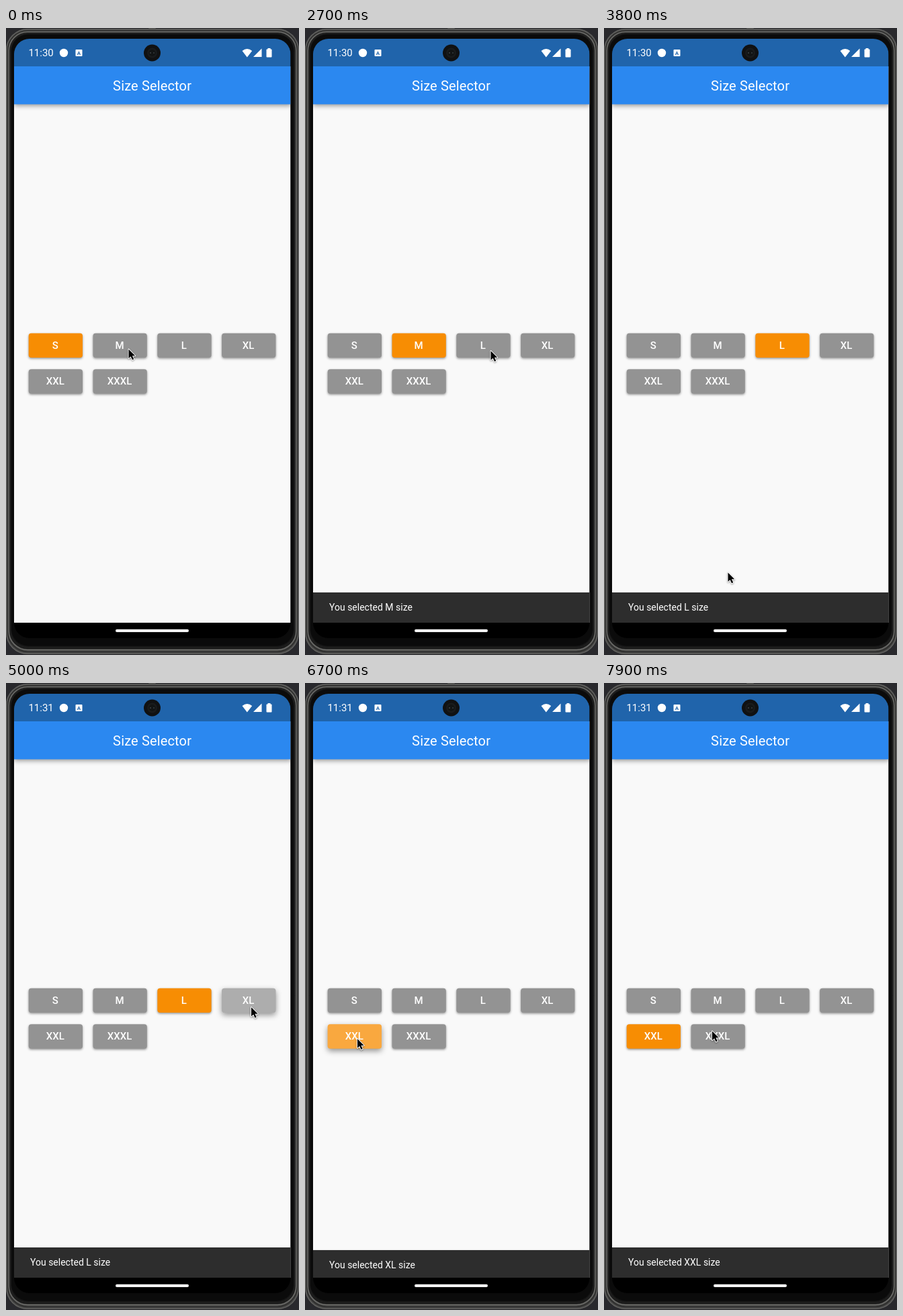
Animation, 436 px wide and 932 px high, one loop 8000 ms. Source, as an HTML page with a canvas:

```html
<!DOCTYPE html>
<html lang="en">
<head>
<meta charset="utf-8">
<title>Size Selector</title>
<style>
  html, body { margin: 0; width: 100%; height: 100%; overflow: hidden; background: #29292d; }
  canvas { display: block; width: 436px; height: 932px; }
</style>
</head>
<body>
<canvas id="stage"></canvas>
<script>
const W = 436, H = 932, LOOP = 8000, STEP = 100;
const canvas = document.getElementById('stage');
const dpr = window.devicePixelRatio || 1;
canvas.width = W * dpr;
canvas.height = H * dpr;
const ctx = canvas.getContext('2d');

const ORANGE = '#f78d03', GREY = '#939393';
const SIZES = ['S', 'M', 'L', 'XL', 'XXL', 'XXXL'];

// Each tap: button index, finger down and up, and the touch point.
const TAPS = [
  { i: 1, down: 300, up: 850, x: 183, y: 478, grow: [[300, 23], [499, 23], [500, 45], [600, 95]] },
  { i: 2, down: 2950, up: 3080, x: 277, y: 480 },
  { i: 3, down: 4850, up: 5060, x: 365, y: 482 },
  { i: 4, down: 6430, up: 6612, x: 78, y: 529 }
];

const SNACKS = [
  { size: 'M', enter: 850, exit: 3080 },
  { size: 'L', enter: 3330, exit: 5066 },
  { size: 'XL', enter: 5316, exit: 6615 },
  { size: 'XXL', enter: 6865, exit: Infinity }
];

// Pointer path: time, x, y.
const PATH = [
  [0, 182.5, 477.5], [1220, 182.5, 477.5], [1400, 180.5, 782.5], [1550, 178, 848],
  [1800, 178, 850], [2150, 236, 560], [2400, 270, 494], [2700, 276.5, 480],
  [3450, 276.5, 480], [3800, 184.5, 809.5], [3950, 178, 850], [4200, 178, 850],
  [4550, 352, 510], [4750, 365, 482], [5180, 365, 482], [5500, 174.5, 839.5],
  [5620, 172, 852], [5850, 172, 852], [6250, 92, 560], [6430, 78, 529],
  [6750, 78, 529], [7050, 148, 840], [7200, 152, 866], [7420, 152, 866],
  [7700, 158, 575], [7900, 161, 517.5], [8000, 161, 517.5]
];

const clamp = v => Math.max(0, Math.min(1, v));
const mix = (a, b, k) => a + (b - a) * k;

function follow(keys, t, col) {
  const n = keys.findIndex(k => k[0] > t);
  if (n < 0) return keys[keys.length - 1][col];
  if (n === 0) return keys[0][col];
  const a = keys[n - 1], b = keys[n];
  return mix(a[col], b[col], (t - a[0]) / (b[0] - a[0]));
}

// Cubic curve (0.4, 0, 0.2, 1), solved by bisection.
function fastOutSlowIn(x) {
  if (x <= 0 || x >= 1) return clamp(x);
  let lo = 0, hi = 1;
  for (let n = 0; n < 20; n++) {
    const s = (lo + hi) / 2, r = 1 - s;
    if (1.2 * s * r * r + 0.6 * s * s * r + s * s * s < x) lo = s; else hi = s;
  }
  return lo * lo * (3 - 2 * lo);
}

function rounded(x, y, w, h, r) {
  ctx.beginPath();
  ctx.roundRect(x, y, w, h, r);
}

function box(x, y, w, h, r, color) {
  rounded(x, y, w, h, r);
  ctx.fillStyle = color;
  ctx.fill();
}

function ring(inset, top, bottom, r, color, width) {
  rounded(inset, top, W - inset * 2, bottom - top, r);
  ctx.strokeStyle = color;
  ctx.lineWidth = width;
  ctx.stroke();
}

function poly(points, color) {
  ctx.beginPath();
  points.forEach(([x, y]) => ctx.lineTo(x, y));
  ctx.closePath();
  ctx.fillStyle = color;
  ctx.fill();
}

function disc(x, y, r, color) {
  ctx.beginPath();
  ctx.arc(x, y, r, 0, Math.PI * 2);
  ctx.fillStyle = color;
  ctx.fill();
}

function label(str, x, y, font, align = 'left', color = '#fff', spacing = 0) {
  ctx.font = font + ' Roboto, sans-serif';
  ctx.letterSpacing = spacing + 'px';
  ctx.textAlign = align;
  ctx.fillStyle = color;
  ctx.fillText(str, x, y);
}

function shadow(color, blur, dy) {
  ctx.shadowColor = color;
  ctx.shadowBlur = blur * dpr;
  ctx.shadowOffsetY = dy * dpr;
}

function drawBody() {
  ctx.fillStyle = '#29292d';
  ctx.fillRect(0, 0, W, H);
  box(0, 1, W, 930, 32, '#424241');
  ring(0.8, 2, 930, 31, '#61615f', 1.4);
  ring(2.6, 4, 927, 30, '#2b2b2a', 1.2);
  ring(4.2, 5.6, 924.5, 28, '#6c6c69', 1.4);
  box(5.2, 7, W - 10.4, 916, 27, '#171717');
  ring(6.5, 8.2, 921, 26, '#242423', 1);
  box(8, 9.5, W - 16, 909, 25, '#0b0b0b');
  box(212, 0, 11, 3, 1, '#565654');
}

function drawStatus(t) {
  ctx.fillStyle = '#2064ab';
  ctx.fillRect(12, 16, 411.5, 41);
  label(t < 4300 ? '11:30' : '11:31', 33.4, 42, '400 15px');
  disc(86, 37, 6.2, '#fff');
  box(103.5, 32, 10, 10, 1, '#fff');
  label('A', 108.5, 40, '700 8px', 'center', '#2064ab');

  ctx.beginPath();
  ctx.moveTo(358.8, 43.5);
  ctx.lineTo(351.5, 34);
  ctx.quadraticCurveTo(358.8, 27.8, 366.2, 34);
  ctx.closePath();
  ctx.fillStyle = '#fff';
  ctx.fill();
  poly([[368, 43], [380.5, 30.5], [380.5, 43]], '#fff');
  box(387.5, 31.5, 8, 12, 1, '#fff');
  box(389.5, 30, 4, 2.5, 0.5, '#fff');

  disc(217.5, 37, 12.5, '#101112');
  disc(217.5, 37, 7.5, '#191b1c');
  disc(217.5, 37, 5, '#121414');
  disc(215, 37, 1, '#3c4346');
  disc(220, 37, 1, '#343b3e');
}

function drawBar() {
  ctx.save();
  shadow('rgba(0,0,0,0.42)', 7, 2.5);
  ctx.fillStyle = '#2b88f0';
  ctx.fillRect(12, 57, 411.5, 56.4);
  ctx.restore();
  label('Size Selector', 217.6, 93, '400 20px', 'center', '#fff', 0.15);
}

function drawRipple(tap, t) {
  const alpha = 0.24 * (1 - clamp((t - tap.up - 100) / 150));
  if (t < tap.down || alpha <= 0) return;
  const r = tap.grow ? follow(tap.grow, t, 1) : mix(18, 95, clamp((t - tap.down) / 230));
  disc(tap.x, tap.y, r, `rgba(255,255,255,${alpha})`);
}

function drawButton(i, t, chosen) {
  const x = 33.7 + 95.8 * (i % 4), y = i < 4 ? 453.7 : 507.2;
  const tap = TAPS.find(p => p.i === i);
  const lift = tap ? clamp((t - tap.down) / 150) * (1 - clamp((t - tap.up - 100) / 150)) : 0;
  ctx.save();
  shadow('rgba(0,0,0,0.42)', 3.5 + 4.5 * lift, 1.5 + 2 * lift);
  box(x, y, 80.3, 36.2, 4, i === chosen ? ORANGE : GREY);
  ctx.restore();
  ctx.save();
  rounded(x, y, 80.3, 36.2, 4);
  ctx.clip();
  if (tap) drawRipple(tap, t);
  ctx.restore();
  label(SIZES[i], x + 39.5, y + 23.2, '500 15px', 'center');
}

function drawSnack(t) {
  for (const s of SNACKS) {
    if (t < s.enter || t >= s.exit + 250) continue;
    const leaving = t > s.exit;
    const k = leaving ? 1 - (t - s.exit) / 250 : clamp((t - s.enter) / 250);
    const h = 45 * fastOutSlowIn(k), top = 884 - h;
    ctx.save();
    ctx.beginPath();
    ctx.rect(12, top, 411.5, h);
    ctx.clip();
    ctx.fillStyle = '#2d2d2d';
    ctx.fillRect(12, top, 411.5, h);
    ctx.globalAlpha = leaving ? 1 : clamp((k - 0.74) / 0.26);
    label(`You selected ${s.size} size`, 36, top + 27.4, '400 14px');
    ctx.restore();
  }
}

function drawPointer(t) {
  ctx.save();
  ctx.translate(follow(PATH, t, 1), follow(PATH, t, 2));
  ctx.scale(0.92, 0.92);
  const arrow = new Path2D('M0 0V14.8L3.4 11.6L6 17.2L8.4 16.1L5.9 10.7H10.6Z');
  ctx.lineJoin = 'round';
  ctx.strokeStyle = '#fff';
  ctx.lineWidth = 2;
  shadow('rgba(0,0,0,0.4)', 2.5, 1);
  ctx.stroke(arrow);
  shadow('transparent', 0, 0);
  ctx.fillStyle = '#000';
  ctx.fill(arrow);
  ctx.restore();
}

function draw(t) {
  ctx.setTransform(dpr, 0, 0, dpr, 0, 0);
  drawBody();
  ctx.save();
  rounded(12, 16, 411.5, 891, 23);
  ctx.clip();
  ctx.fillStyle = '#f9f9f9';
  ctx.fillRect(12, 57, 411.5, 827);
  drawBar();
  drawStatus(t);
  const chosen = TAPS.reduce((c, p) => t >= p.up ? p.i : c, 0);
  SIZES.forEach((_, i) => drawButton(i, t, chosen));
  drawSnack(t);
  ctx.fillStyle = '#000';
  ctx.fillRect(12, 884, 411.5, 23);
  box(163, 893.8, 109, 4.2, 2.1, '#f4f4f4');
  ctx.restore();
  drawPointer(t);
}

const start = performance.now();
function tick() {
  const t = (performance.now() - start) % LOOP;
  draw(Math.floor(t / STEP) * STEP);
  requestAnimationFrame(tick);
}
tick();
</script>
</body>
</html>
```
